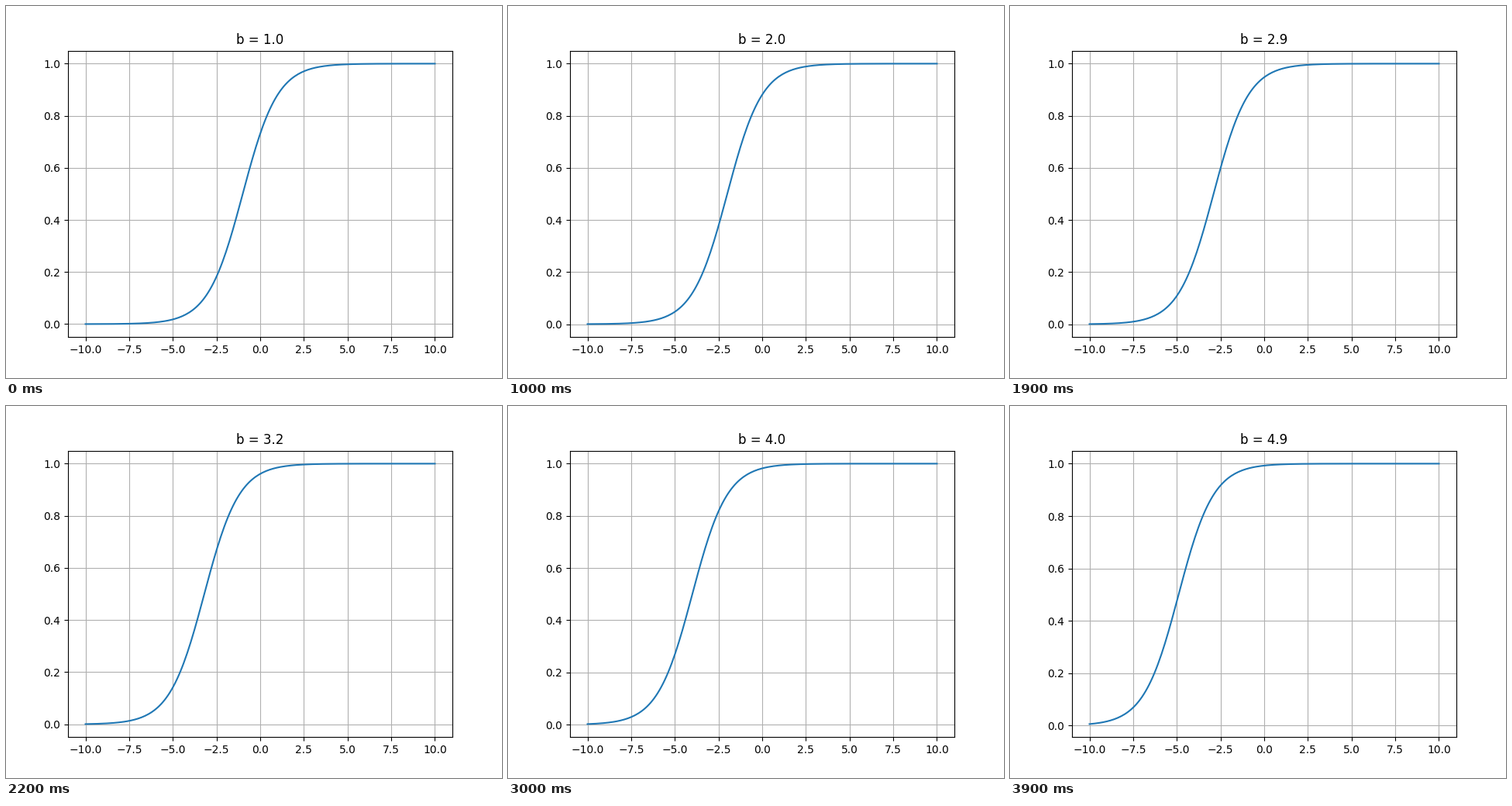
A matplotlib script that plays this animation: 640 px wide and 480 px high, repeating every 4 s.

```python
import matplotlib.pyplot as plt
import numpy as np
from matplotlib.animation import FuncAnimation

FRAMES = 40
INTERVAL = 100

x = np.linspace(-10, 10, 200)


def sigmoid(z):
    return 1 / (1 + np.exp(-z))


fig, ax = plt.subplots(figsize=(6.4, 4.8), dpi=100)


def draw(i):
    """Redraw the curve for its bias; the y axis rescales to fit."""
    b = 1 + i / 10
    ax.clear()
    ax.plot(x, sigmoid(x + b))
    ax.set_title(f"b = {b:.1f}")
    ax.grid(True)


anim = FuncAnimation(fig, draw, frames=FRAMES, interval=INTERVAL,
                     init_func=lambda: draw(0), repeat=True, repeat_delay=0)
plt.show()
```
